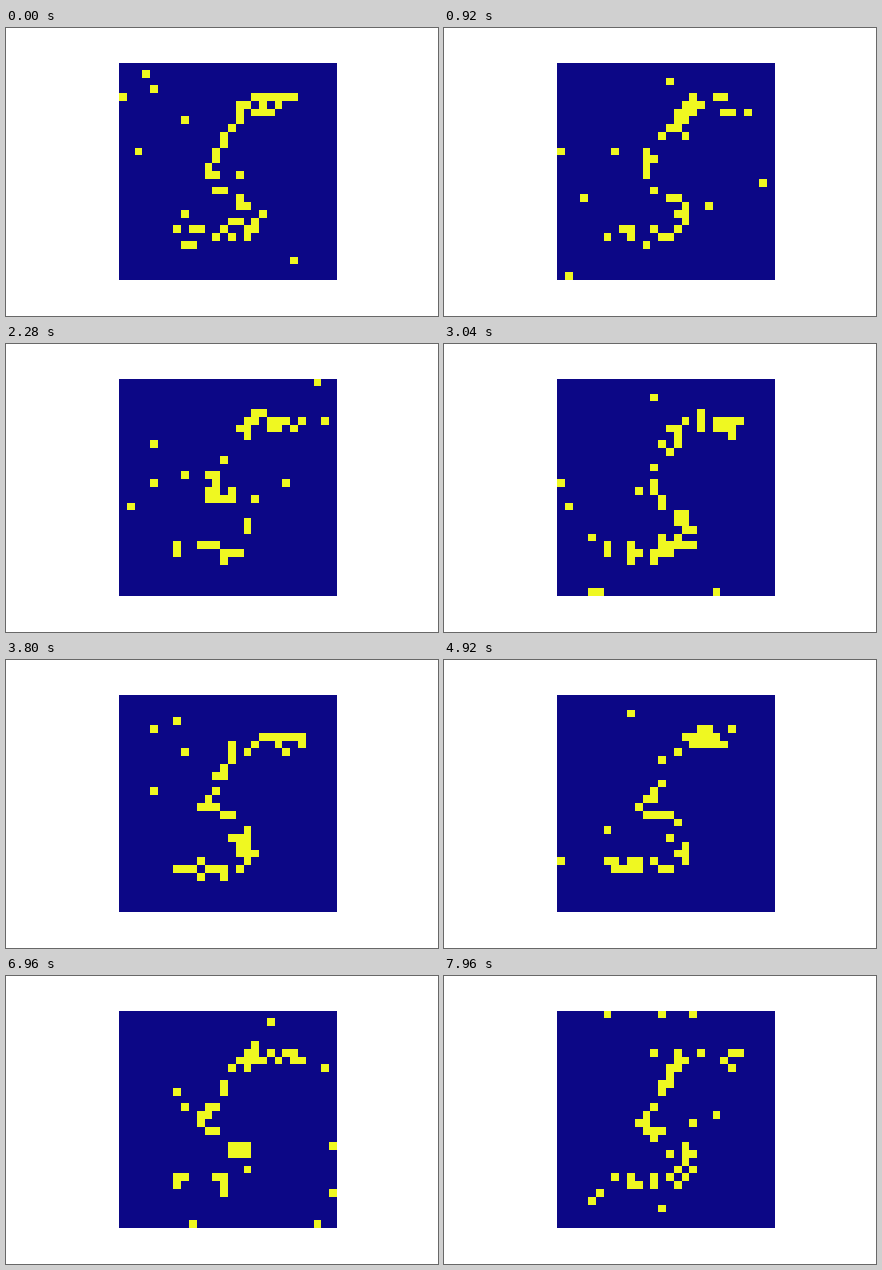
Write a matplotlib script that moves like this. It is 432x288 px and loops after 8 s.

```python
import numpy as np
import matplotlib.pyplot as plt
from matplotlib.animation import FuncAnimation

SIZE = 28
FRAMES, INTERVAL = 200, 40
RATE, NOISE = 0.5, 0.01


def curve(start, bend, end):
    """Points on a quadratic Bezier, as (column, row) cells."""
    t = np.linspace(0, 1, 60)[:, None]
    start, bend, end = map(np.array, (start, bend, end))
    return (1 - t) ** 2 * start + 2 * t * (1 - t) * bend + t ** 2 * end


def stroke(points, half_width):
    """Soft-edged pen stroke on the grid, 1 at its centre line."""
    rows, cols = np.mgrid[:SIZE, :SIZE]
    dist = np.hypot(cols[..., None] - points[:, 0],
                    rows[..., None] - points[:, 1]).min(axis=-1)
    return np.exp(-(dist / half_width) ** 4)


# A handwritten "5": bar, stem, shoulder and bowl
ink = np.max([
    stroke(curve((22, 5.7), (17.5, 3.9), (14.5, 6.6)), 1.35),
    stroke(curve((14.5, 6.6), (12.5, 9.5), (11, 14)), 0.8),
    stroke(curve((11, 14), (14, 16), (16, 18.8)), 1.2),
    stroke(curve((16, 18.8), (16, 22.6), (7.5, 21.6)), 1.25),
], axis=0)

# Each cell fires independently in every time step
rng = np.random.default_rng(5)
spikes = rng.random((FRAMES, SIZE, SIZE)) < np.maximum(RATE * ink, NOISE)

fig, ax = plt.subplots(figsize=(6, 4), dpi=72, facecolor="white")
fig.subplots_adjust(left=0.125, right=0.9, bottom=0.125, top=0.88)
ax.axis("off")
image = ax.imshow(spikes[0].astype(float), cmap="plasma", vmin=0, vmax=1,
                  interpolation="nearest")


def update(step):
    image.set_data(spikes[step].astype(float))
    return [image]


anim = FuncAnimation(fig, update, frames=FRAMES, interval=INTERVAL,
                     repeat=True, repeat_delay=0)
plt.show()
```
